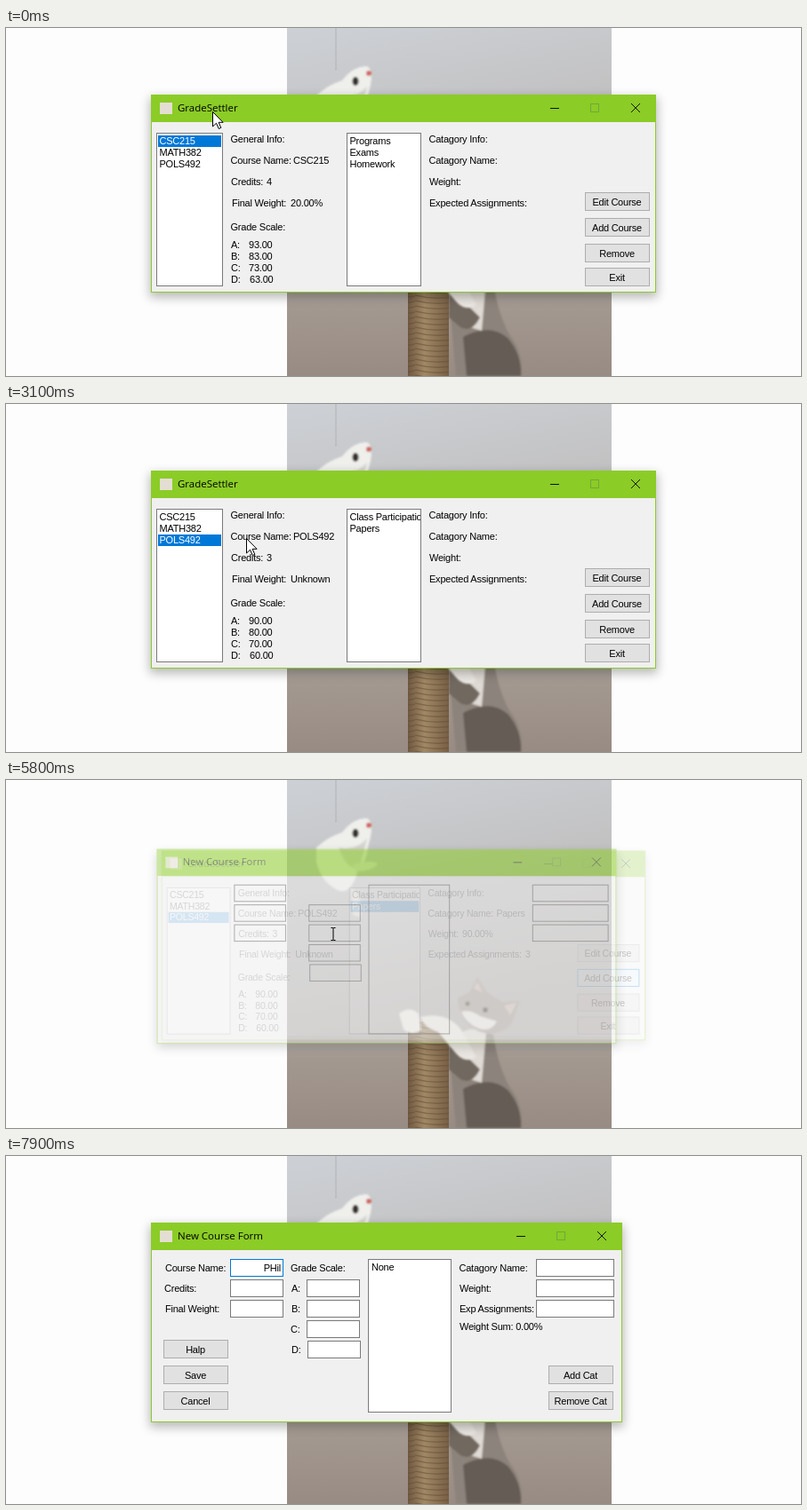
An HTML page that plays this animation: 894 px wide and 392 px high, repeating every 8 s.

```html
<!DOCTYPE html>
<html lang="en">
<head>
<meta charset="utf-8">
<title>Course forms</title>
<style>
  html, body { margin: 0; width: 100%; height: 100%; overflow: hidden; background: #fdfdfd; }
  svg { display: block; width: 894px; height: 392px; }
  text { font: 11px "Liberation Sans", Arial, sans-serif; letter-spacing: -.22px; fill: #000; white-space: pre; }
  .title { font: 11.5px "Open Sans", "Noto Sans", sans-serif; letter-spacing: 0; }
  .mid { text-anchor: middle; }
  .end { text-anchor: end; }
  .lit { fill: #fff; }
</style>
</head>
<body>
<svg viewBox="0 0 894 392">
  <defs>
    <linearGradient id="wall" x2=".25" y2="1">
      <stop stop-color="#cdd1d6"/><stop offset=".3" stop-color="#c6c7c9"/><stop offset="1" stop-color="#b4b0ad"/>
    </linearGradient>
    <linearGradient id="floor" x2="0" y2="1">
      <stop stop-color="#b0aba7"/><stop offset=".25" stop-color="#a3988f"/><stop offset="1" stop-color="#988b83"/>
    </linearGradient>
    <linearGradient id="post">
      <stop stop-color="#6f5840"/><stop offset=".4" stop-color="#a18865"/><stop offset="1" stop-color="#775f45"/>
    </linearGradient>
    <pattern id="rope" width="46" height="6" patternUnits="userSpaceOnUse">
      <path d="M0 1Q23 7 46 2" fill="none" stroke="#5f4b35" stroke-width="1.3" opacity=".5"/>
    </pattern>
    <filter id="soft"><feGaussianBlur stdDeviation="1.3"/></filter>
    <filter id="glow" x="-10%" y="-20%" width="120%" height="140%"><feGaussianBlur stdDeviation="6"/></filter>
    <clipPath id="photo"><path d="M316 0h365v392H316z"/></clipPath>
    <clipPath id="listClip"><path d="M384 119h82v171h-82z"/></clipPath>
  </defs>
  <g clip-path="url(#photo)">
    <path d="M316 0h365v290H316z" fill="url(#wall)"/>
    <path d="M316 288h365v104H316z" fill="url(#floor)"/>
    <path d="M371 0V48" stroke="#b0b2b5" fill="none"/>
    <g filter="url(#soft)">
      <path d="M349 76Q362 64 378 59Q390 43 406 43Q413 47 410 64L407 76Q406 92 396 100Q390 128 375 125Q354 116 349 92Z" fill="#efefec"/>
      <path d="M374 76Q393 80 406 66L398 98Q384 104 374 76" fill="#d6d5d1"/>
      <path d="M390 95q26-6 28 0q-8 8-24 8z" fill="#e4e3df"/>
      <path d="M388 122q13 5 11 33l-9-3z" fill="#dddad4"/>
      <ellipse cx="393" cy="60" rx="3.5" ry="5" fill="#35332f"/>
      <circle cx="408" cy="51" r="3" fill="#cf6a60"/>
      <path d="M497 292Q520 278 548 287Q554 325 567 347Q581 365 580 392H506Z" fill="#8c837b"/>
      <path d="M514 348Q544 332 564 349Q580 367 579 392H518Z" fill="#655c54"/>
      <path d="M501 292Q519 275 540 283L535 341Q510 335 501 320Z" fill="#dfdad4"/>
      <path d="M498 300q16 0 21 12l14 14q-9 18-22 11l-13-11z" fill="#71675e"/>
      <path d="M508 246L522 238L530 222L541 239L558 250L578 249L568 275Q553 291 531 283Q509 271 508 246Z" fill="#a8a099"/>
      <path d="M512 261Q522 258 533 266L552 272Q545 284 532 280Q517 274 512 261Z" fill="#e9e5e0"/>
      <path d="M526 235l4-8 6 12zM560 254l14-3-7 14z" fill="#cbbab1"/>
      <circle cx="519" cy="252" r="2.5" fill="#4b453f"/><circle cx="539" cy="259" r="3" fill="#4b453f"/>
    </g>
    <path d="M452 277Q474 266 498 277V392H452Z" fill="url(#post)"/>
    <path d="M452 277H498V392H452Z" fill="url(#rope)"/>
    <g filter="url(#soft)" fill="#eae6e1">
      <path d="M442 263q12-9 22 0l3 19q-10 7-20-1z"/>
      <path d="M466 267q28-7 45 13l18 32q-13 8-23-4l-20-24q-15-4-20-17z"/>
    </g>
  </g>
  <g id="view"></g>
</svg>
<script>
const LOOP = 8000, STEP = 100;
const ACCENT = '#8bcc26', BLUE = '#0078d7', EDGE = '#7a7a7a';
const view = document.getElementById('view');

const rect = (x, y, w, h, fill, stroke = 'none', extra = '') =>
  `<rect x="${x + .5}" y="${y + .5}" width="${w}" height="${h}" fill="${fill}" stroke="${stroke}" ${extra}/>`;
const fillRect = (x, y, w, h, fill) => `<path d="M${x} ${y}h${w}v${h}h${-w}z" fill="${fill}"/>`;
// y is the middle of the line
const text = (x, y, s, cls = '') => `<text x="${x}" y="${y + 4}" class="${cls}">${s}</text>`;
const texts = rows => rows.map(r => text(...r)).join('');
const field = (x, y, w, h, edge = EDGE, fill = '#fff') => rect(x, y, w, h, fill, edge);
const button = (x, y, s, hot) =>
  rect(x, y, 72, 20, hot ? '#e5f1fb' : '#e1e1e1', hot ? BLUE : '#adadad') + text(x + 36, y + 11, s, 'mid');

function frame(w, h, name) {
  const r = 164 + w;
  return rect(161, 78, w + 4, h + 3, '#000', 'none', 'filter="url(#glow)" opacity=".27"') +
    rect(163, 75, w, h, '#f0f0f0', ACCENT) +
    fillRect(163, 75, w + 1, 31, ACCENT) +
    fillRect(173, 84, 14, 13, '#e4ddd2') +
    text(193, 90, name, 'title') +
    `<path d="M${r - 119} 90.5h10M${r - 28} 85l10 10m0-10l-10 10" stroke="#111" fill="none"/>` +
    rect(r - 74, 85, 9, 9, 'none', '#74a63a');
}

function list(x, w, items, chosen) {
  const rows = items.map((s, i) => {
    const on = i === chosen, y = 121 + i * 13;
    return (on ? fillRect(x + 2, y, w - 3, 13, BLUE) : '') + text(x + 3.5, y + 6, s, on ? 'lit' : '');
  });
  return field(x, 118, w, 172) + rows.join('');
}

const courses = ['CSC215', 'MATH382', 'POLS492'];
const first = { row: 0, credits: 4, weight: '20.00%', base: 3, cats: ['Programs', 'Exams', 'Homework'],
  pick: 0, pickAt: 1100, share: '20.00%', count: 4 };
const last = { row: 2, credits: 3, weight: 'Unknown', base: 0, cats: ['Class Participation', 'Papers'],
  pick: 1, pickAt: 4000, share: '90.00%', count: 3 };

function courseWindow(t) {
  const c = t < 2700 ? first : last;
  const picked = t >= c.pickAt;
  const scale = [...'ABCD'].map((k, i) =>
    text(253, 244 + i * 13, k + ':') + text(i === 3 ? 274 : 273, 244 + i * 13, `${90 - i * 10 + c.base}.00`));
  return frame(567, 222, 'GradeSettler') +
    list(169, 74, courses, c.row) +
    `<g clip-path="url(#listClip)">${list(383, 83, c.cats, picked ? c.pick : -1)}</g>` +
    rect(383, 118, 83, 172, 'none', EDGE) +
    texts([
      [252.5, 125, 'General Info:'], [252.5, 149, 'Course Name:'], [323, 149, courses[c.row]],
      [253, 173, 'Credits:'], [293, 173, c.credits], [254, 197, 'Final Weight:'], [320, 197, c.weight],
      [252.5, 224, 'Grade Scale:'], [475.5, 125, 'Catagory Info:'], [475.5, 149, 'Catagory Name:'],
      [476, 173, 'Weight:'], [476, 197, 'Expected Assignments:']
    ]) +
    (picked ? texts([[556, 149, c.cats[c.pick]], [516, 173, c.share], [590, 197, c.count]]) : '') +
    scale.join('') +
    button(651, 185, 'Edit Course') + button(651, 214, 'Add Course', t >= 5000) +
    button(651, 243, 'Remove') + button(651, 270, 'Exit');
}

const newFields = (fill, focus = BLUE) =>
  [0, 1, 2].map(i => field(252, 116 + i * 23, 59, 19, i ? EDGE : focus, fill) +
    field(596, 116 + i * 23, 87, 19, EDGE, fill)).join('') +
  [0, 1, 2, 3].map(i => field(i === 3 ? 339 : 338, 139 + i * 23, 59, 19, EDGE, fill)).join('') +
  field(407, 116, 93, 172, EDGE, fill);

const newFrame = () => frame(529, 224, 'New Course Form');

function newWindow(typed) {
  return newFrame() + newFields() +
    texts([
      [179, 126, 'Course Name:'], [178, 149, 'Credits:'], [179, 172, 'Final Weight:'],
      [320, 126, 'Grade Scale:'], [321, 149, 'A:'], [321, 172, 'B:'], [320, 195, 'C:'], [321, 218, 'D:'],
      [411, 125, 'None'], [509.5, 126, 'Catagory Name:'], [510, 149, 'Weight:'],
      [510, 172, 'Exp Assignments:'], [510, 192, 'Weight Sum: 0.00%'], [309, 126, typed, 'end']
    ]) +
    button(177, 207, 'Halp') + button(177, 236, 'Save') + button(177, 265, 'Cancel') +
    button(610, 236, 'Add Cat') + button(610, 265, 'Remove Cat');
}

const group = (cx, k, alpha, body) =>
  `<g opacity="${alpha}" transform="translate(${cx} 186) scale(${k}) translate(${-cx} -186)">${body}</g>`;

function windows(t) {
  if (t < 5800) return courseWindow(t);
  if (t < 5900) {
    return group(447, .958, .22, courseWindow(t)) + group(428, .975, .4, newFrame()) +
      group(428, .975, .6, newFields('none', EDGE));
  }
  if (t < 6000) return group(428, .995, .9, newWindow(''));
  const keys = [7200, 7400, 7600, 7800];
  return newWindow('PHil'.slice(0, keys.filter(k => t >= k).length));
}

const path = [
  [0, 232, 94], [200, 232, 94], [1000, 403, 127], [1200, 403, 128], [1400, 402, 140], [1900, 402, 142],
  [2500, 205, 152], [2800, 205, 152], [3100, 270, 151], [3600, 405, 140], [4300, 405, 141],
  [5000, 665, 223], [5600, 671, 221], [5700, 540, 200], [5800, 368, 173], [6000, 362, 168],
  [6600, 301, 111], [LOOP, 301, 111]
];

function cursor(t) {
  if (t >= 7200) return '';
  const i = path.findIndex(p => p[0] > t) - 1;
  const [t0, x0, y0] = path[i], [t1, x1, y1] = path[i + 1];
  const u = (t - t0) / (t1 - t0), e = u * u * (3 - 2 * u);
  const at = `transform="translate(${Math.round(x0 + (x1 - x0) * e)} ${Math.round(y0 + (y1 - y0) * e)})"`;
  return t >= 5800 && t < 6000
    ? `<path ${at} d="M-2.5-6.5h2l.5.5.5-.5h2M0-6V7M-2.5 7.5h2L0 7l.5.5h2" fill="none" stroke="#000"/>`
    : `<path ${at} d="M.5.5v16.5l4-3.8 2.8 6.3 2.5-1.1-2.7-6.1h5z" fill="#fff" stroke="#000"/>`;
}

let shown = -1;
function draw(now) {
  const t = Math.floor(now % LOOP / STEP) * STEP;
  if (t !== shown) {
    shown = t;
    view.innerHTML = windows(t) + cursor(t);
  }
  requestAnimationFrame(draw);
}
draw(performance.now());
</script>
</body>
</html>
```
